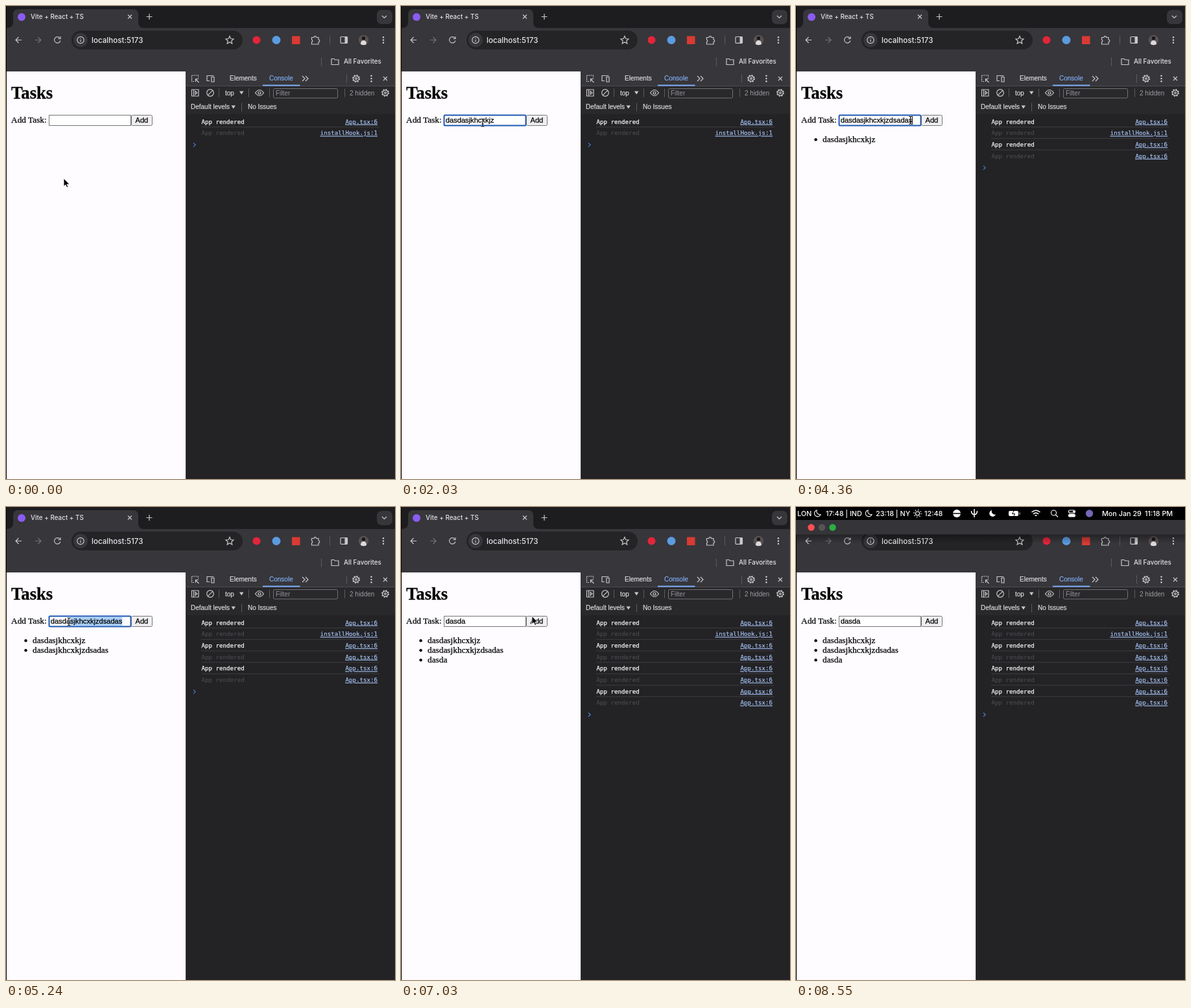
Recreate the animation shown at these times as an HTML page. Size 600 px wide and 730 px high, loop 8580 ms.

```html
<!DOCTYPE html>
<html lang="en">
<head>
<meta charset="utf-8">
<title>Tasks</title>
<style>
  html, body { margin: 0; width: 100%; height: 100%; overflow: hidden; background: #1d1c1e; }
  svg { display: block; }
  text { white-space: pre; }
  .ui { font: 500 9.9px Inter, sans-serif; fill: #e4e2e6; }
  .url { font: 500 11.6px Inter, sans-serif; fill: #e8e6ea; }
  .dev { font: 10px "Liberation Sans", Arial, sans-serif; fill: #e3e1e5; stroke: #e3e1e5; stroke-width: .15; }
  .mono { font: 9.17px "DejaVu Sans Mono", monospace; fill: #f6f4f8; stroke: #f6f4f8; stroke-width: .25; }
  .dim { fill: #514f53; stroke: none; }
  .link { fill: #a9c8fb; stroke: #a9c8fb; stroke-width: .15; text-decoration: underline; }
  .serif { font: 13.33px "Liberation Serif", Times, serif; stroke: #000; stroke-width: .25; }
  .h1 { font: bold 26.67px "Liberation Serif", Times, serif; stroke: #000; stroke-width: .3; }
  .field { font: 11.11px "Liberation Sans", Arial, sans-serif; stroke: #000; stroke-width: .25; }
  .bar { font: 500 10.8px Inter, sans-serif; fill: #fff; }
  .line { fill: none; stroke: #c9c7cb; stroke-width: 1.2; }
  .sep { stroke: #5c5b5f; }
</style>
</head>
<body>
<svg width="600" height="730" viewBox="0 0 600 730">
  <defs>
    <g id="gear" class="line">
      <circle r="5.2" stroke-dasharray="2 2.08" stroke-width="1.6"/>
      <circle r="4.2"/><circle r="1.4"/>
    </g>
    <g id="dots" fill="#d5d3d7"><circle cy="-4.2" r="1.2"/><circle r="1.2"/><circle cy="4.2" r="1.2"/></g>
    <path id="moon" d="M-1-5a5 5 0 1 0 6 6.5A5 5 0 0 1-1-5Z"/>
    <path id="close" class="line" d="M-3-3 3 3M3-3-3 3"/>
    <linearGradient id="shade" x2="0" y2="1">
      <stop stop-color="#000" stop-opacity=".35"/><stop offset="1" stop-color="#000" stop-opacity="0"/>
    </linearGradient>
  </defs>

  <!-- browser frame -->
  <rect width="600" height="101" fill="#1d1c1e"/>
  <path d="M0 34Q11 34 11 25V13Q11 5 19 5H196Q204 5 204 13V25Q204 34 213 34H600V101H0Z" fill="#37363a"/>
  <circle cx="24" cy="17" r="6" fill="#8a5cf0"/>
  <text class="ui" x="38" y="20">Vite + React + TS</text>
  <use href="#close" x="191" y="16.5"/>
  <path class="line" d="M216.5 16.5h9M221 12v9"/>
  <rect x="572" y="6" width="24" height="22" rx="7" fill="#37363a"/>
  <path class="line" d="m580 15 3.5 3.5 3.5-3.5" stroke-width="1.5"/>
  <path class="line" d="M24 52.5h-9m4.5-4.5L15 52.5l4.5 4.5"/>
  <path class="line" d="M45 52.5h9M49.5 48l4.5 4.5-4.5 4.5" style="stroke:#747276"/>
  <path class="line" d="M83 49.5a4.7 4.7 0 1 0 .8 4M84 47v3.5h-3.5"/>
  <rect x="101" y="38" width="264" height="29" rx="14.5" fill="#242326"/>
  <circle cx="115" cy="52.5" r="11" fill="#37363a"/>
  <circle class="line" cx="115" cy="52.5" r="5.2"/>
  <path class="line" d="M115 51.8v3.5M115 49.4v1.2"/>
  <text class="url" x="132" y="56.5">localhost:5173</text>
  <path class="line" d="m345 46.5 1.8 4 4.2.4-3.2 2.8 1 4.3-3.8-2.3-3.8 2.3 1-4.3-3.2-2.8 4.2-.4Z"/>
  <circle cx="386.5" cy="52.5" r="6" fill="#e3253c"/>
  <circle cx="417" cy="52.5" r="6.5" fill="#5b9be0"/>
  <rect x="441" y="46.5" width="12.5" height="12.5" fill="#d93a34"/>
  <path class="line" d="M471.500 48.500h3.500a1.800 1.800 0 0 1 3.600 0h3.400v3.500a1.800 1.800 0 0 1 0 3.600v3.400h-10.500v-3.400a1.900 1.900 0 0 0 0-3.600Z"/>
  <path class="sep" d="M499.5 45.5v14"/>
  <rect class="line" x="516" y="47.5" width="10.5" height="9.8" rx="1"/>
  <path d="M522.5 47.5h4v10h-4Z" fill="#c9c7cb"/>
  <circle cx="551.5" cy="52.5" r="7.8" fill="#575152"/>
  <path d="M547 59q0-6 4.5-6t4.5 6q-4.5 2.5-9 0Z" fill="#dedadb"/>
  <circle cx="551.5" cy="49.8" r="2.7" fill="#1b1718"/>
  <use href="#dots" x="582" y="52.5"/>
  <path class="sep" d="M486.5 79.5v13"/>
  <path class="line" d="M502 81.5h4l1.5 1.5h5.5v7.5h-11Z"/>
  <text class="ui" x="521" y="89">All Favorites</text>

  <!-- page -->
  <rect y="101" width="277" height="629" fill="#fefcff"/>
  <rect width="1" height="730" fill="#000"/>
  <text class="h1" x="8" y="143">Tasks</text>
  <text class="serif" x="8" y="180">Add Task:</text>
  <rect id="box" x="66.5" y="168.5" width="126" height="16" fill="#fff"/>
  <rect id="selection" y="170" height="13" fill="#a9d0f7"/>
  <text id="value" class="field" x="68.8" y="180"></text>
  <path id="caret" stroke="#000"/>
  <rect x="193.5" y="168.5" width="32" height="16" rx="2" fill="#efeef0" stroke="#767578"/>
  <text class="field" x="199.5" y="180">Add</text>
  <g id="list"></g>

  <!-- developer tools -->
  <rect x="277" y="101" width="323" height="629" fill="#232225"/>
  <rect x="277" y="101" width="323" height="22" fill="#37363a"/>
  <rect x="277" y="123" width="323" height="44" fill="#29282b"/>
  <path d="M278 123.5h322" stroke="#4d4c50"/>
  <path d="M277.5 101v629" stroke="#3b3a3d"/>
  <path d="M396 122.5h57.5" stroke="#7cacf8" stroke-width="1.8"/>
  <path class="line" d="M290 116.5h-3.5v-9.5h10v3.5" stroke-dasharray="1.8 1"/>
  <path class="line" d="m297.5 118-5-5m0 4v-4.5h4.5"/>
  <path class="line" d="M314 115.5h-4v-8h10.5M317 109.5h4v7.5h-4Z"/>
  <text class="dev" x="345" y="115">Elements</text>
  <text class="dev" x="406" y="115" style="fill:#82b1fa;stroke:#82b1fa">Console</text>
  <path class="line" d="m457 108 4 4-4 4m5-8 4 4-4 4"/>
  <path class="sep" d="M525.5 105.5v13M328.5 127.5v13M374.5 127.5v13M406.5 127.5v13M522.5 127.5v13M363.5 149.5v13"/>
  <use href="#gear" x="540" y="112"/><use href="#dots" x="563.5" y="112"/><use href="#close" x="585" y="112"/>
  <path class="line" d="M286.5 129h10.5v10h-10.5ZM289.5 129v10M292 131.5l3 2.5-3 2.5Z"/>
  <circle class="line" cx="315" cy="134" r="5.3"/><path class="line" d="m311.3 137.7 7.4-7.4"/>
  <text class="dev" x="338" y="138">top</text>
  <path d="M360 131.5h6.5l-3.25 5ZM347.5 153.5h6.5l-3.25 5Z" fill="#c9c7cb"/>
  <path class="line" d="M384.5 134q6.5-9 13 0-6.5 9-13 0Z"/><circle class="line" cx="391" cy="134" r="2"/>
  <rect x="412.5" y="127.5" width="99" height="14.5" rx="2" fill="#29282b" stroke="#737176"/>
  <text class="dev" x="416" y="138" style="fill:#969499;stroke:none">Filter</text>
  <text class="dev" x="530" y="138" style="fill:#9d9ba0;stroke:none">2 hidden</text>
  <use href="#gear" x="585" y="134"/>
  <text class="dev" x="285" y="159">Default levels</text>
  <text class="dev" x="373" y="159">No Issues</text>
  <g id="logs"></g>
  <path id="prompt" d="m289-3 3.2 3-3.2 3" fill="none" stroke="#4a86d6" stroke-width="1.1"/>

  <!-- menu bar and window title bar -->
  <g id="menu">
    <rect y="-30" width="600" height="50" fill="#000"/>
    <rect y="20" width="600" height="22.5" fill="#353438"/>
    <rect y="42.5" width="600" height="14" fill="url(#shade)"/>
    <circle cx="23.5" cy="31.5" r="5.2" fill="#fb4f52"/>
    <circle cx="40" cy="31.5" r="5.2" fill="#555458"/>
    <circle cx="56.5" cy="31.5" r="5.2" fill="#2aae43"/>
    <g class="bar">
      <text x="2" y="13.5">LON</text><text x="46" y="13.5">17:48 | IND</text>
      <text x="123" y="13.5">23:18 | NY</text><text x="198" y="13.5">12:48</text>
      <text x="472" y="13.5">Mon Jan 29</text><text x="538" y="13.5">11:18 PM</text>
      <use href="#moon" x="303" y="10"/>
      <circle cx="248" cy="10" r="6"/><path d="M241 10h14" stroke="#000" stroke-width="1.5"/>
      <rect x="328" y="6" width="15" height="8" rx="2"/><path d="M345 8.5v3" stroke="#fff"/>
      <path d="m336.5 5-3 5.5h4l-2 4.5" stroke="#000" fill="none"/>
      <circle cx="452.5" cy="10" r="5.7" fill="#7566b8"/>
    </g>
    <g fill="none" stroke="#fff" stroke-width="1.1">
      <use href="#moon" x="33" y="10"/><use href="#moon" x="112" y="10"/>
      <circle cx="187.5" cy="10" r="3"/><circle cx="187.5" cy="10" r="5.5" stroke-dasharray="1 3.32" stroke-width="2"/>
      <path d="M275 3v13M270.5 6q0 5 4.5 6 4.5-1 4.5-6" stroke-width="1.5"/>
      <path d="M363.5 8q6.5-5.5 13 0M366 10.8q4-3.3 8 0M368.5 13.3q1.5-1.2 3 0" stroke-width="1.6"/>
      <circle cx="397.5" cy="9" r="4"/><path d="m400.5 12 3.5 3.5"/>
      <rect x="420.5" y="5" width="10" height="4" rx="2"/><rect x="420.5" y="11" width="10" height="4" rx="2" fill="#fff"/>
      <circle cx="428.5" cy="7" r="1" fill="#fff"/>
    </g>
  </g>

  <path id="arrow" d="M0 0V12.5L2.9 9.9 4.8 14.2 6.9 13.3 5 9.2H9Z" fill="#000" stroke="#fff" stroke-width=".9"/>
  <g id="beam" fill="none">
    <path d="M-2.5-6Q0-6 0-4.5 0-6 2.5-6M0-4.5v9M-2.5 6Q0 6 0 4.5 0 6 2.5 6M-1.5 2h3" stroke="#fff" stroke-width="2.2" opacity=".6"/>
    <path d="M-2.5-6Q0-6 0-4.5 0-6 2.5-6M0-4.5v9M-2.5 6Q0 6 0 4.5 0 6 2.5 6M-1.5 2h3" stroke="#000" stroke-width="1.1"/>
  </g>
</svg>
<script>
const LOOP = 8580, TEXT_X = 68.8;
const FIRST = "dasdasjkhcxkjz", SECOND = FIRST + "dsadas", THIRD = "dasda";

// Pointer stops: time, x, y
const POINTER = [
  [0, 89, 266], [210, 89, 266], [760, 126, 180], [2030, 126, 180],
  [2300, 211, 177], [2600, 211, 177], [3000, 164, 176], [4300, 164, 176],
  [4480, 211, 177], [4650, 211, 177], [4850, 181, 177], [4900, 181, 177],
  [5200, 97, 177], [5750, 97, 177], [6200, 158, 175], [6350, 158, 175],
  [6650, 212, 177], [6950, 212, 177], [7560, 3, -1], [7720, 3, -1], [7850, -16, -16]
];
const FOCUS = [[780, 2440], [3050, 4560], [4900, 6790]];
const ADDED = [[2450, FIRST], [4570, SECOND], [6800, THIRD]];
const TYPING = [[900, 1500, 0, FIRST.length], [3550, 4150, FIRST.length, SECOND.length]];
const DELETE_AT = 5700;
const MENU = [7590, 7850];

const $ = id => document.getElementById(id);
const show = (el, on) => el.setAttribute("visibility", on ? "visible" : "hidden");
const clamp = v => Math.max(0, Math.min(1, v));
const ease = v => v * v * (3 - 2 * v);

const pen = document.createElement("canvas").getContext("2d");
pen.font = '11.11px "Liberation Sans", Arial, sans-serif';
const edge = text => TEXT_X + pen.measureText(text).width;

const logs = Array.from({ length: 8 }, (_, i) => {
  const y = 181.8 + i * 17.66;
  const source = i === 1 ? "installHook.js:1" : "App.tsx:6";
  const rule = i ? `<path d="M301 ${y - 12.7}H576" stroke="#3d3c40"/>` : "";
  return `<g>${rule}<text class="mono ${i % 2 ? "dim" : ""}" x="301.5" y="${y}">App rendered</text>
    <text class="mono link" x="573" y="${y}" text-anchor="end">${source}</text></g>`;
});
$("logs").innerHTML = logs.join("");
$("list").innerHTML = ADDED.map(([, text], i) =>
  `<g><circle cx="30.5" cy="${206.3 + i * 15}" r="2.2"/>
   <text class="serif" x="41" y="${210 + i * 15}">${text}</text></g>`).join("");

function pointerAt(t) {
  const i = POINTER.findIndex(stop => stop[0] > t);
  if (i < 0) return POINTER.at(-1).slice(1);
  const [t0, x0, y0] = POINTER[i - 1], [t1, x1, y1] = POINTER[i];
  const p = ease((t - t0) / (t1 - t0));
  return [x0 + (x1 - x0) * p, y0 + (y1 - y0) * p];
}

function valueAt(t) {
  if (t >= DELETE_AT) return THIRD;
  let length = 0;
  for (const [start, end, from, to] of TYPING) {
    if (t >= start) length = from + Math.ceil(clamp((t - start) / (end - start)) * (to - from));
  }
  return SECOND.slice(0, length);
}

function drawField(t, x) {
  const value = valueAt(t), focus = FOCUS.find(([a, b]) => t >= a && t < b);
  $("value").textContent = value;
  const box = $("box");
  box.setAttribute("stroke", focus ? "#1d59b3" : "#767578");
  box.setAttribute("stroke-width", focus ? 2 : 1);
  box.setAttribute("rx", focus ? 1.5 : 0);

  const selecting = t >= 4900 && t < DELETE_AT;
  let left = SECOND.length;
  while (selecting && left > THIRD.length && edge(SECOND.slice(0, left - 1)) > x - 1) left--;
  const from = edge(SECOND.slice(0, left));
  show($("selection"), selecting);
  $("selection").setAttribute("x", from);
  $("selection").setAttribute("width", edge(SECOND) - from);

  const typing = TYPING.some(([a, b]) => t >= a && t < b);
  const marks = [...FOCUS.map(f => f[0]), ...TYPING.map(s => s[1]), DELETE_AT];
  const since = t - Math.max(0, ...marks.filter(m => m <= t));
  show($("caret"), focus && !selecting && (typing || since % 1000 < 500));
  $("caret").setAttribute("d", `M${edge(value)} 170v13`);
}

function draw(t) {
  const [x, y] = pointerAt(t);
  const count = ADDED.filter(([at]) => t >= at).length;
  const rows = 2 + 2 * count;
  [...$("list").children].forEach((el, i) => show(el, i < count));
  [...$("logs").children].forEach((el, i) => show(el, i < rows));
  $("prompt").setAttribute("transform", `translate(0 ${178.9 + rows * 17.7})`);
  drawField(t, x);

  const slide = ease(clamp((t - MENU[0]) / (MENU[1] - MENU[0])));
  show($("menu"), slide > 0);
  $("menu").setAttribute("transform", `translate(0 ${-43.5 * (1 - slide)})`);

  const overField = x > 66 && x < 193 && y > 168 && y < 185;
  for (const id of ["arrow", "beam"]) {
    show($(id), (id === "beam") === overField);
    $(id).setAttribute("transform", `translate(${x} ${y})`);
  }
}

function tick() {
  draw(performance.now() % LOOP);
  requestAnimationFrame(tick);
}
tick();
</script>
</body>
</html>
```
